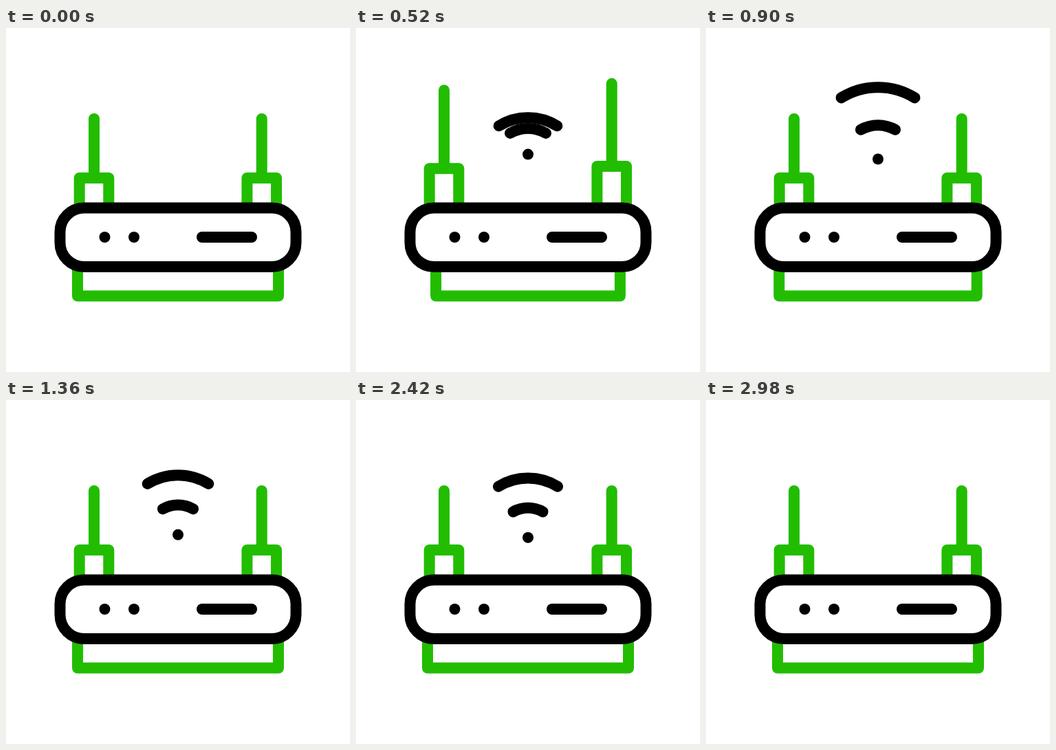
Recreate the animation shown at these times as an HTML page. Size 500 px wide and 500 px high, loop 3 s.

```html
<!DOCTYPE html>
<html lang="en">
<head>
<meta charset="utf-8">
<title>Router signal</title>
<style>
html, body { margin: 0; width: 100%; height: 100%; overflow: hidden; background: #fff; }
svg { display: block; width: 100vw; height: 100vh; }
path, line, rect { fill: none; stroke-width: 16; stroke-linecap: round; stroke-linejoin: round; }
circle { stroke: none; }
.green { stroke: #22bd00; }
.black { stroke: #000; }
</style>
</head>
<body>
<svg viewBox="0 0 500 500">
  <g class="green">
    <path id="base"/>
    <path id="left"/>
    <path id="right"/>
  </g>
  <g id="signal" class="black">
    <path id="outer"/>
    <path id="inner"/>
    <circle id="dot" cx="250" r="8"/>
  </g>
  <g class="black">
    <rect x="78.5" y="261.5" width="343" height="85.5" rx="35" style="fill:#fff"/>
    <line x1="285" y1="304" x2="357" y2="304"/>
    <circle cx="143.5" cy="304" r="8"/>
    <circle cx="186" cy="304" r="8"/>
  </g>
</svg>
<script>
const LOOP = 3000, SETTLE = 1640;
const el = id => document.getElementById(id);
const clamp = v => Math.min(1, Math.max(0, v));
const span = (t, a, b) => clamp((t - a) / (b - a));
const smooth = u => (1 - Math.cos(Math.PI * u)) / 2;
const fade = u => Math.pow(1 - u, 3.4);

// Cubic bezier ease with control points (x1, 0) and (x2, 1).
function bezier(x, x1, x2) {
  let lo = 0, hi = 1;
  for (let i = 0; i < 24; i++) {
    const s = (lo + hi) / 2, r = 1 - s;
    if (3 * r * r * s * x1 + 3 * r * s * s * x2 + s * s * s < x) lo = s; else hi = s;
  }
  return lo * lo * (3 - 2 * lo);
}

// Each part shoots out of the router, passes its rest height, then settles.
const parts = {
  dot:   { y: 196, over: 20, start: 400, peak: 560, size0: 1, grow: 0, fall: 32 },
  inner: { y: 153, over: 39, start: 422, peak: 590, size0: 0.79, grow: 0.0117, fall: 31, half: 22, sag: 5.8 },
  outer: { y: 110, over: 60, start: 405, peak: 670, size0: 0.51, grow: 0.009, fall: 28.5, half: 44, sag: 12.5 }
};

function pose(p, t, drop) {
  let shift, size;
  if (t < p.peak) {
    const u = span(t, p.start, p.peak);
    shift = (304 - p.y + p.over) * (1 - u) ** 2 - p.over;
    size = p.size0 + u * (1 + p.over * p.grow - p.size0);
  } else {
    shift = -p.over * fade(span(t, p.peak, SETTLE));
    size = 1 - shift * p.grow - drop * 0.17;
  }
  return { y: p.y + shift + drop * p.fall, size };
}

function drawArc(id, t, drop) {
  const p = parts[id], { y, size } = pose(p, t, drop);
  const h = p.half * size, g = p.sag * size, r = (h * h + g * g) / (2 * g);
  el(id).setAttribute("d", `M${250 - h} ${y + g}A${r} ${r} 0 0 1 ${250 + h} ${y + g}`);
}

function drawAntenna(id, x, t, delay) {
  const s = t - delay;
  const lift = s < 380 ? smooth(span(s, 100, 380)) : 1 - smooth(span(s, 380, 700));
  const top = 218 - 23.3 * lift, tip = 132 - 70 * lift;
  el(id).setAttribute("d",
    `M${x - 21.3} 275V${top}H${x + 21.3}V275M${x} ${top}V${tip}`);
}

function draw(t) {
  const squeeze = t < 440
    ? 16 * smooth(span(t, 100, 440))
    : 16 * Math.pow(1 - span(t, 440, SETTLE), 4);
  el("base").setAttribute("d", `M${104 + squeeze} 320V389.5H${396 - squeeze}V320`);
  drawAntenna("left", 128, t, 0);
  drawAntenna("right", 371.7, t, 30);

  const drop = bezier(span(t, 2040, 2980), 0.8, 0.667);
  drawArc("outer", t, drop);
  drawArc("inner", t, drop);
  el("dot").setAttribute("cy", pose(parts.dot, t, drop).y);
  el("signal").setAttribute("opacity", t < 396 ? 0 : 1 - span(t, 2840, 2980));
}

const begin = performance.now();
function tick() {
  draw((performance.now() - begin) % LOOP);
  requestAnimationFrame(tick);
}
tick();
</script>
</body>
</html>
```
